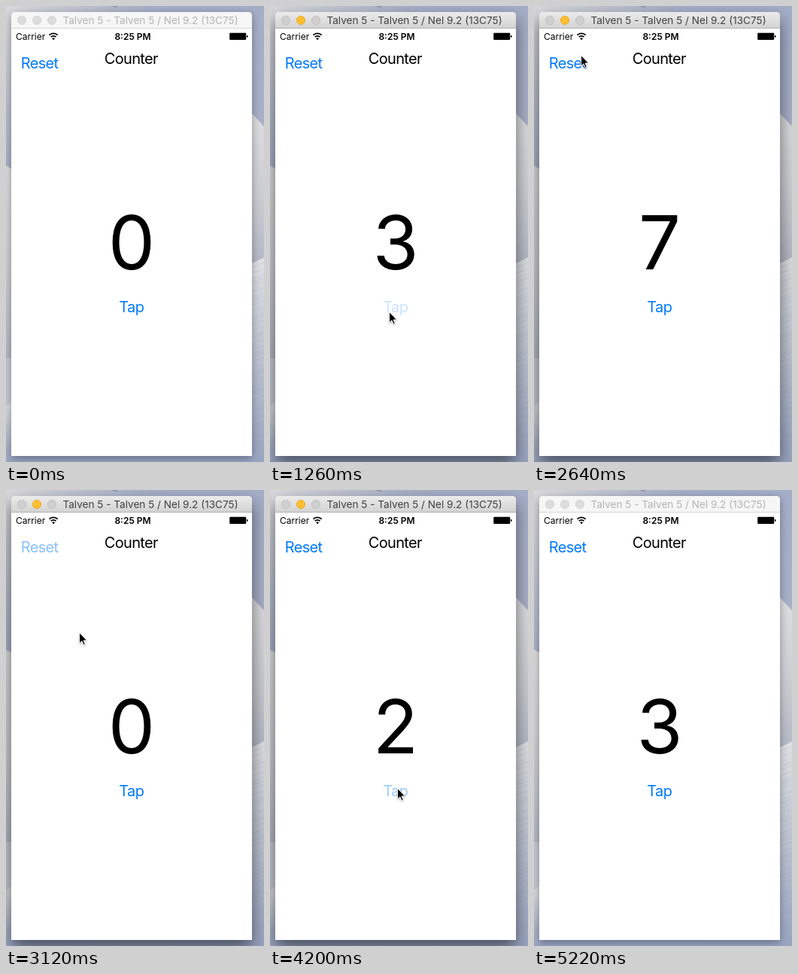
An HTML page for the animation above (5.28 s loop, 343 by 606 pixels).

```html
<!DOCTYPE html>
<html lang="en">
<head>
<meta charset="utf-8">
<title>Counter</title>
<style>
  html, body { margin: 0; width: 100%; height: 100%; overflow: hidden; }
  svg { display: block; width: 100%; height: 100%; font-family: Inter, "Liberation Sans", sans-serif; }
  .label { font-size: 20px; letter-spacing: -0.033em; }
  .link { fill: #007aff; }
  .mid { text-anchor: middle; }
  #count { font-size: 99px; font-optical-sizing: none; }
</style>
</head>
<body>
<svg viewBox="0 0 343 606" preserveAspectRatio="none">
  <defs>
    <linearGradient id="sky" x2="0" y2="1">
      <stop offset="0" stop-color="#a5aec8"/>
      <stop offset=".3" stop-color="#a9b0c6"/>
      <stop offset="1" stop-color="#98a4c2"/>
    </linearGradient>
    <linearGradient id="haze">
      <stop offset="0" stop-color="#dcdade"/>
      <stop offset=".55" stop-color="#c3c6d1" stop-opacity=".7"/>
      <stop offset="1" stop-color="#a9b0c6" stop-opacity="0"/>
    </linearGradient>
    <linearGradient id="leftSky" x2="0" y2="1">
      <stop offset="0" stop-color="#dad8dd"/>
      <stop offset=".5" stop-color="#c0c4d0"/>
      <stop offset="1" stop-color="#a9b1c7"/>
    </linearGradient>
    <linearGradient id="snow" x2="0" y2="1">
      <stop offset="0" stop-color="#dcdddf"/>
      <stop offset=".55" stop-color="#cccdd2"/>
      <stop offset="1" stop-color="#b4b8c5"/>
    </linearGradient>
    <linearGradient id="slope" x2="0" y2="1">
      <stop offset="0" stop-color="#dfe0e3"/>
      <stop offset=".4" stop-color="#c3c8d3"/>
      <stop offset="1" stop-color="#99a4c0"/>
    </linearGradient>
    <linearGradient id="barOn" x2="0" y2="1">
      <stop offset="0" stop-color="#ebebeb"/>
      <stop offset="1" stop-color="#d2d2d2"/>
    </linearGradient>
    <filter id="soft" x="-30%" y="-20%" width="160%" height="140%"><feGaussianBlur stdDeviation="11"/></filter>
    <filter id="faint" x="-20%" y="-10%" width="140%" height="120%"><feGaussianBlur stdDeviation="6"/></filter>
    <filter id="drop" x="-50%" y="-50%" width="200%" height="200%">
      <feDropShadow dx="0" dy="1" stdDeviation=".8" flood-opacity=".35"/>
    </filter>
  </defs>

  <!-- wallpaper -->
  <rect width="343" height="606" fill="url(#sky)"/>
  <rect width="220" height="12" fill="url(#haze)"/>
  <rect width="8" height="214" fill="url(#leftSky)"/>
  <path d="M0 212L8 217V468H0Z" fill="url(#snow)"/>
  <path d="M0 468H8V525L0 532Z" fill="#c6cad5"/>
  <path d="M0 532L8 525V606H0Z" fill="url(#slope)"/>
  <path d="M327 143L343 160V335L327 342Z" fill="url(#snow)"/>
  <path d="M327 342L343 334V606H327Z" fill="url(#slope)"/>
  <path id="grain" fill="none" stroke="#8f98b4" stroke-opacity=".2" stroke-width=".8"/>
  <path d="M140 0L146 2L149 0Z" fill="#8790aa"/>

  <!-- window -->
  <rect id="shadowOff" x="7" y="11" width="320" height="590" rx="5" opacity=".34" filter="url(#faint)"/>
  <rect id="shadowOn" x="7" y="18" width="320" height="590" rx="5" opacity=".52" filter="url(#soft)"/>
  <path d="M7 598V13a5 5 0 0 1 5-5H322a5 5 0 0 1 5 5V598Z" fill="#fff"/>
  <path id="bar" d="M7 30V13a5 5 0 0 1 5-5H322a5 5 0 0 1 5 5V30Z"/>
  <path id="rule" d="M7 29.5H327"/>
  <g id="lights">
    <circle cx="21" cy="19" r="5.7"/>
    <circle cx="41" cy="19" r="5.7"/>
    <circle cx="61" cy="19" r="5.7"/>
  </g>
  <text id="title" class="mid" x="192" y="24" font-size="13.6">Talven 5 - Talven 5 / Nel 9.2 (13C75)</text>

  <!-- status bar -->
  <text x="13" y="45" font-size="12">Carrier</text>
  <g fill="none" stroke="#000" stroke-width="1.7">
    <path d="M57.5 38.7a8 8 0 0 1 11.2 0"/>
    <path d="M59.7 41.2a4.8 4.8 0 0 1 6.8 0"/>
  </g>
  <path d="M63.1 45.2L61.2 43.2a2.7 2.7 0 0 1 3.8 0Z"/>
  <text class="mid" x="168.5" y="45" font-size="12" font-weight="600">8:25 PM</text>
  <rect x="297.2" y="35.7" width="22" height="9.2" rx="1"/>
  <path d="M320 38.7a1.6 1.6 0 0 1 0 3.2Z"/>

  <!-- app -->
  <text id="reset" class="label link" x="19.8" y="83">Reset</text>
  <text class="label mid" x="166.3" y="77">Counter</text>
  <text id="count" class="mid" x="167" y="350">0</text>
  <text id="tap" class="label link mid" x="166.8" y="407">Tap</text>

  <path id="cursor" d="M-.4-.5V13.9L2.9 10.8L5.1 15.9L7.3 14.9L5.1 10H9.6Z"
        stroke="#fff" stroke-width="1" stroke-linejoin="round" filter="url(#drop)"/>
</svg>
<script>
const LOOP = 5280, STEP = 60, FADE = 470;
const WAKE = 900, SLEEP = 5220;
const $ = id => document.getElementById(id);
const set = (el, attrs) => { for (const k in attrs) el.setAttribute(k, attrs[k]); };

// [down, up] times of each press
const resets = [[2820, 2940]];
const taps = [];
for (let k = 0; k < 7; k++) taps.push([900 + 150 * k, 960 + 150 * k]);
for (let k = 0; k < 3; k++) taps.push([3720 + 270 * k, 3780 + 270 * k]);

// [time, x, y] of the pointer tip
const path = [
  [120, 184, 34], [240, 181, 96], [420, 168, 280], [540, 156, 386], [600, 154, 405], [720, 159, 407],
  [2100, 159, 407], [2160, 150, 372], [2220, 134, 300], [2340, 93, 142], [2460, 59, 66], [2520, 56, 54],
  [2640, 63, 66], [2760, 62, 70], [3000, 62, 70], [3120, 98, 190], [3240, 148, 350], [3300, 163, 391],
  [3420, 170, 397], [4440, 170, 397], [4560, 163, 370], [4680, 146, 272], [4740, 142, 80],
  [4800, 139, 40], [4860, 137, 22], [5040, 137, -2]
];

function pointer(t) {
  const i = path.findIndex(p => p[0] > t);
  if (i < 1) return null;
  const a = path[i - 1], b = path[i], f = (t - a[0]) / (b[0] - a[0]);
  return [a[1] + (b[1] - a[1]) * f, a[2] + (b[2] - a[2]) * f];
}

function alpha(presses, t) {
  const last = presses.filter(p => p[0] <= t).pop();
  if (!last) return 1;
  const f = Math.min(1, Math.max(0, (t - last[1]) / FADE));
  return 0.2 + 0.8 * f * f * (3 - 2 * f);
}

function counter(t) {
  const cleared = resets[0][1];
  const from = t >= cleared ? cleared : 0;
  return taps.filter(p => p[1] > from && p[1] <= t).length;
}

function setActive(on) {
  set($('shadowOn'), { visibility: on ? 'visible' : 'hidden' });
  set($('shadowOff'), { visibility: on ? 'hidden' : 'visible' });
  set($('bar'), { fill: on ? 'url(#barOn)' : '#f6f6f6' });
  set($('rule'), { stroke: on ? '#b1b1b1' : '#d6d6d6' });
  set($('title'), { fill: on ? '#404040' : '#b4b4b4' });
  [...$('lights').children].forEach((dot, i) => {
    const amber = on && i === 1;
    set(dot, {
      fill: amber ? '#fdbe2f' : on ? '#cfcfcf' : '#dcdcdc',
      stroke: amber ? '#e0a123' : on ? '#b9b9b9' : '#d0d0d0',
      'stroke-width': 0.7
    });
  });
}

function draw(time) {
  const t = Math.floor(time % LOOP / STEP) * STEP;
  setActive(t >= WAKE && t < SLEEP);
  $('count').textContent = counter(t);
  set($('tap'), { opacity: alpha(taps, t) });
  set($('reset'), { opacity: alpha(resets, t) });
  const p = pointer(t);
  set($('cursor'), p
    ? { visibility: 'visible', transform: `translate(${p[0].toFixed(1)} ${p[1].toFixed(1)})` }
    : { visibility: 'hidden' });
}

// fine slanted streaks on the snow
let streaks = '';
for (let y = 350; y < 600; y += 5) streaks += `M327 ${y + 3 * Math.sin(y)}l16 -6`;
$('grain').setAttribute('d', streaks);

const start = performance.now();
function tick() {
  draw(performance.now() - start);
  requestAnimationFrame(tick);
}
draw(0);
requestAnimationFrame(tick);
</script>
</body>
</html>
```
